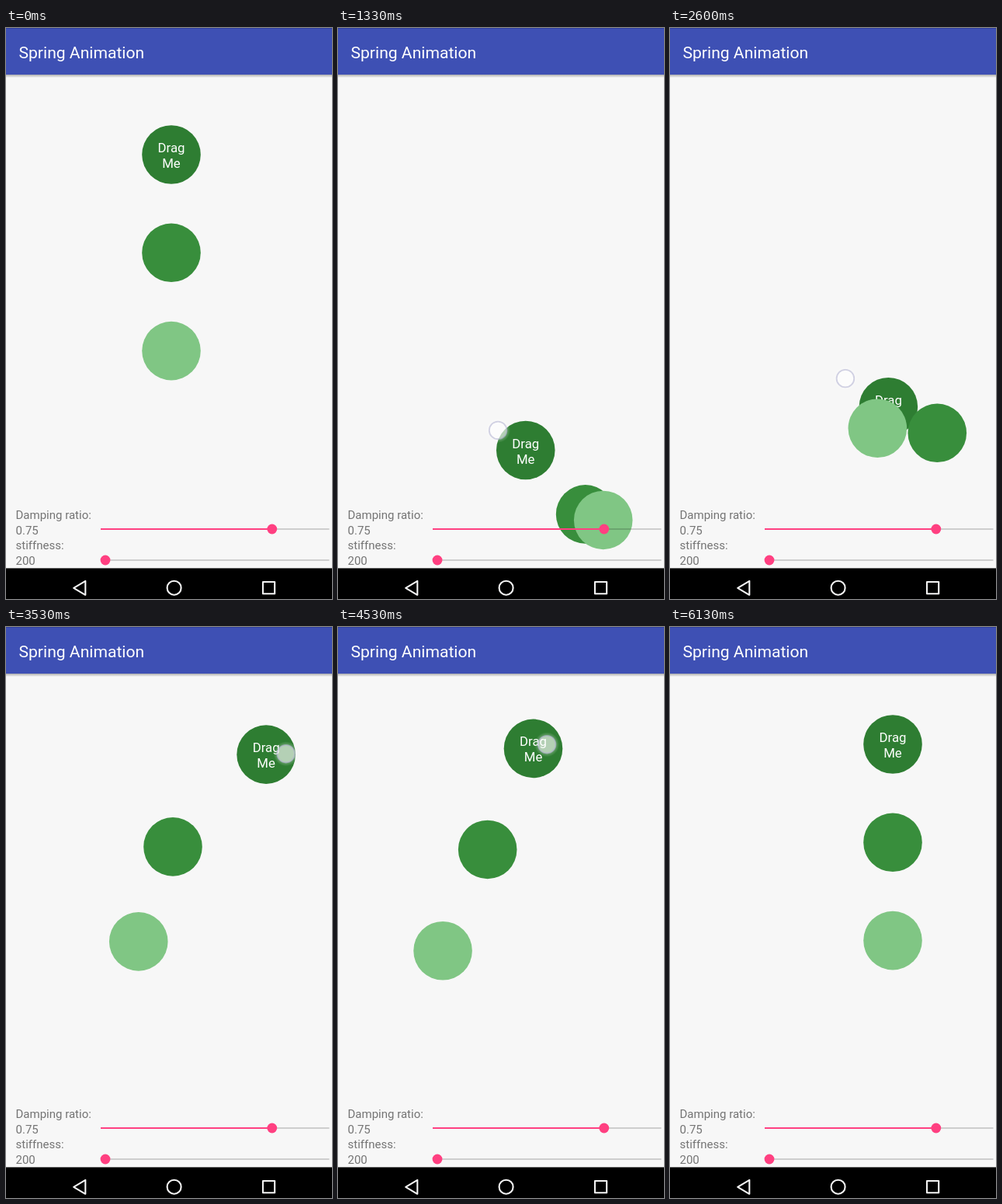
An HTML page for the animation above (6.19 s loop, 420 by 735 pixels).

```html
<!DOCTYPE html>
<html lang="en">
<head>
<meta charset="utf-8">
<title>Spring Animation</title>
<style>
  html, body { margin: 0; width: 100%; height: 100%; overflow: hidden; background: #f7f7f7; }
  svg { display: block; width: 420px; height: 735px; font-family: Roboto, "Open Sans", sans-serif; }
  .title { font-size: 21.1px; fill: #fff; }
  .label { font-size: 15px; fill: #747474; }
  .drag { font-size: 16.8px; fill: #fff; text-anchor: middle; }
  .track { stroke: #000; stroke-opacity: .17; stroke-width: 2; }
  .accent { fill: #ff4081; }
  .nav { fill: none; stroke: #f4f4f4; stroke-width: 2.1; stroke-linejoin: round; }
</style>
</head>
<body>
<svg viewBox="0 0 420 735">
  <defs>
    <linearGradient id="shade" x2="0" y2="1">
      <stop offset="0" stop-color="#000" stop-opacity=".3"/>
      <stop offset="1" stop-color="#000" stop-opacity="0"/>
    </linearGradient>
    <radialGradient id="halo">
      <stop offset=".7" stop-color="#fff" stop-opacity=".28"/>
      <stop offset="1" stop-color="#fff" stop-opacity="0"/>
    </radialGradient>
  </defs>
  <rect width="420" height="735" fill="#f7f7f7"/>

  <g id="lead">
    <circle r="37.8" fill="#2e7d32"/>
    <text class="drag" y="-3">Drag</text>
    <text class="drag" y="17">Me</text>
  </g>
  <circle id="mid" r="37.8" fill="#388e3c"/>
  <circle id="tail" r="37.8" fill="#80c684"/>

  <text class="label" x="12.5" y="631.7">Damping ratio:</text>
  <text class="label" x="12.5" y="651.5">0.75</text>
  <text class="label" x="12.5" y="671.3">stiffness:</text>
  <text class="label" x="12.5" y="691.2">200</text>
  <path class="track" d="M343 645H416.5M122 685H416.5"/>
  <rect class="accent" x="122" y="644" width="221" height="2"/>
  <circle class="accent" cx="342.8" cy="645" r="6.4"/>
  <circle class="accent" cx="128" cy="685" r="6.4"/>

  <g id="touch">
    <circle r="16" fill="url(#halo)"/>
    <circle r="11.3" fill="#fff" fill-opacity=".5" stroke="#b4b4d2" stroke-opacity=".6" stroke-width="1.8"/>
  </g>

  <rect y="60" width="420" height="4" fill="url(#shade)"/>
  <rect width="420" height="60" fill="#3e50b4"/>
  <rect width="420" height="1" fill="#303f9f"/>
  <text class="title" x="16.5" y="39">Spring Animation</text>

  <rect y="695.4" width="420" height="40" fill="#000"/>
  <path class="nav" d="M87.2 720.8L102.3 711.8V729.8Z"/>
  <circle class="nav" cx="216.6" cy="720.7" r="9"/>
  <rect class="nav" x="331" y="713" width="15.2" height="15.2"/>
</svg>
<script>
const LOOP = 6190, STEP = 200 / 3, FRAMES = 93, GAP = 126.3;
const STIFFNESS = 200, DAMPING = 2 * 0.75 * Math.sqrt(STIFFNESS);
const TOUCH_AHEAD = 40, TOUCH_FROM = 530, TOUCH_TO = 5800;

// Turning points of the drag, [time, position]: circles, then side swings, then rest
const turnsX = [
  [700, 213], [1126, 354], [1576, 98], [1866, 370], [2196, 98], [2485, 368], [2785, 98],
  [3040, 367], [3298, 127], [3608, 368], [4120, 80], [4720, 300], [5050, 287]
];
const turnsY = [
  [880, 163], [1310, 547], [1690, 172], [2026, 513], [2303, 172], [2580, 492],
  [2860, 154], [3250, 150], [3800, 177], [4850, 151]
];

// Sine swing from one turning point to the next.
function swing(turns, t) {
  const i = turns.findIndex(([time]) => time > t);
  if (i === 0) return turns[0][1];
  if (i < 0) return turns[turns.length - 1][1];
  const [t0, a] = turns[i - 1], [t1, b] = turns[i];
  return a + (b - a) * (1 - Math.cos(Math.PI * (t - t0) / (t1 - t0))) / 2;
}

const leadAt = t => [swing(turnsX, t), swing(turnsY, t)];

// Each follower springs towards the spot below the circle before it.
function simulate() {
  const [x, y] = leadAt(0), dt = 0.001, frames = [];
  const chain = [1, 2].map(n => ({ p: [x, y + n * GAP], v: [0, 0] }));
  for (let n = 0, ms = 0; n < FRAMES; n++) {
    for (; ms < n * STEP; ms++) {
      let goal = leadAt(ms);
      for (const { p, v } of chain) {
        for (const k of [0, 1]) {
          const pull = goal[k] + k * GAP - p[k];
          v[k] += (STIFFNESS * pull - DAMPING * v[k]) * dt;
          p[k] += v[k] * dt;
        }
        goal = p;
      }
    }
    frames.push(chain.map(({ p }) => [...p]));
  }
  return frames;
}

const followers = simulate();
const [lead, mid, tail, touch] = ["lead", "mid", "tail", "touch"].map(id => document.getElementById(id));
const place = (el, [x, y]) => el.setAttribute("transform", `translate(${x.toFixed(2)} ${y.toFixed(2)})`);
const start = performance.now();

function draw(now) {
  const t = Math.max(0, now - start) % LOOP;
  const n = Math.min(FRAMES - 1, Math.floor((t + 5) / STEP));
  const [fingerX, fingerY] = leadAt(n * STEP + TOUCH_AHEAD);
  place(lead, leadAt(n * STEP));
  place(mid, followers[n][0]);
  place(tail, followers[n][1]);
  place(touch, [fingerX, fingerY - 4]);
  touch.setAttribute("visibility", t >= TOUCH_FROM && t < TOUCH_TO ? "visible" : "hidden");
  requestAnimationFrame(draw);
}
draw(start);
</script>
</body>
</html>
```
